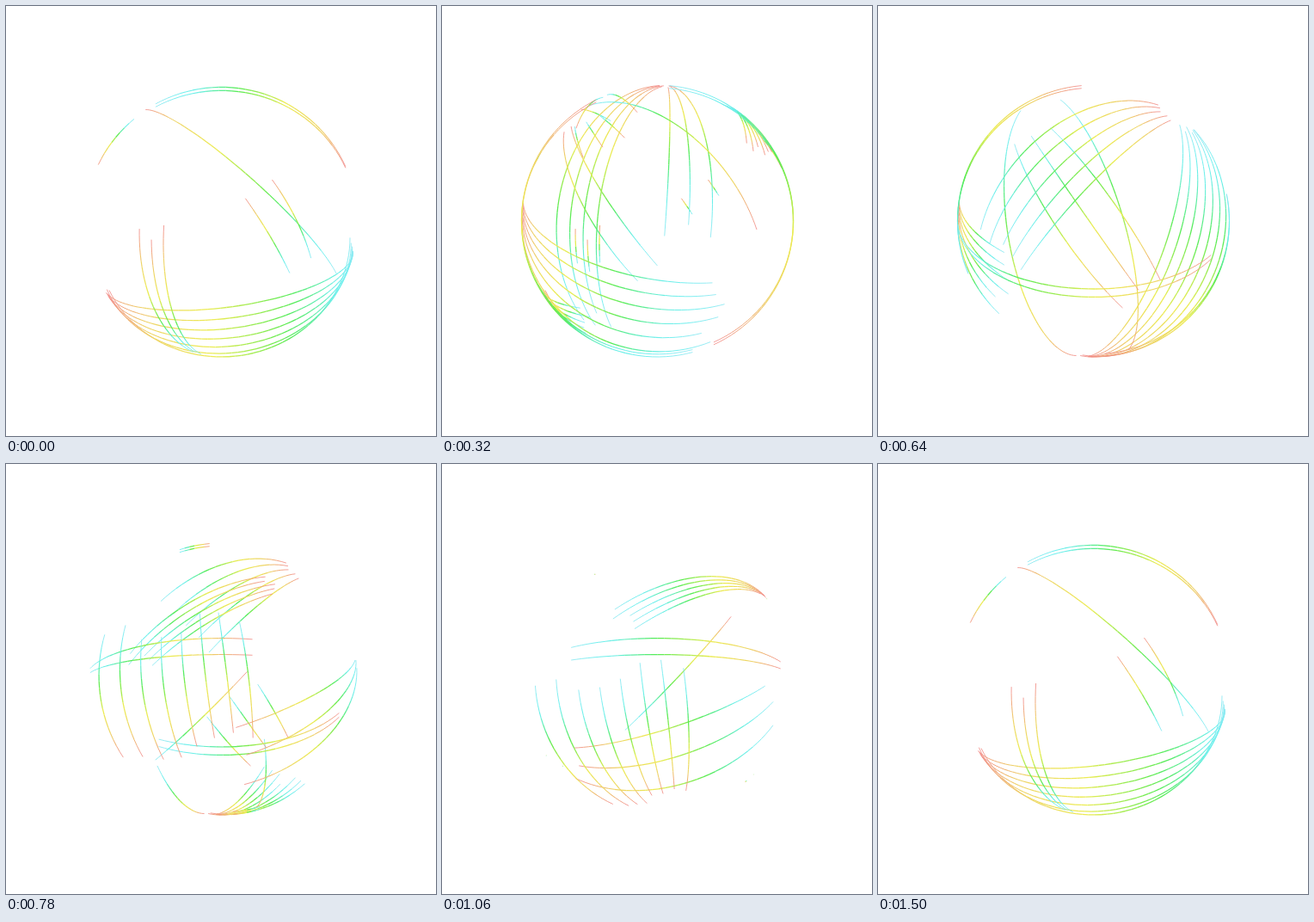
Animation of 500 by 500 pixels, one loop 1.52 s. Source, as an HTML page with a canvas:

```html
<!DOCTYPE html>
<html lang="en">
<head>
<meta charset="utf-8">
<title>Rainbow orbits</title>
<style>
html, body { margin: 0; width: 100%; height: 100%; overflow: hidden; background: #fff; }
canvas { display: block; width: 100vmin; height: 100vmin; }
</style>
</head>
<body>
<canvas id="stage" width="500" height="500"></canvas>
<script>
const LOOP = 1520, CX = 250.5, CY = 250, R = 158;
const HUES = [186, 176, 112, 60, 48, 0]; // from tail to head
const ctx = document.getElementById('stage').getContext('2d');

const rad = deg => deg * Math.PI / 180;
const mix = (a, b, u) => a + (b - a) * u;
const clamp = v => Math.max(0, Math.min(1, v));
const ease = u => u * u * (3 - 2 * u);
const wrap = v => ((v % LOOP) + LOOP) % LOOP;

let seed = 7;
function rnd() {
  seed = (seed * 16807) % 2147483647;
  return seed / 2147483647;
}

const orbits = [];

// Circles on the sphere that share an axis and a latitude and differ in tilt.
// A trail runs along each one between two angles.
function fan(life, count, axis, tilts, angles, lat = 0) {
  for (let i = 0; i < count; i++) {
    const tilt = mix(...tilts, count > 1 ? i / (count - 1) : 0);
    const [from, to] = angles.map(a => a + (count > 2 ? 10 * (rnd() - 0.5) : 0));
    orbits.push({ life, axis: rad(axis), tilt, lat: rad(lat), from: rad(from), to: rad(to) });
  }
}

// Trails that sweep into the lower right
const opening = [1190, 1900];
fan(opening, 7, -8, [0.3, 0.92], [4, 166], 22);
fan(opening, 2, 0, [0.96, 0.985], [-119, -24]);
fan(opening, 1, 222, [0.18, 0.18], [155, 10], 12);
fan(opening, 3, 95, [0.42, 0.6], [10, 84]);
fan(opening, 2, 55, [-0.24, -0.48], [53, 92]);
fan(opening, 1, 0, [0.98, 0.98], [-130, -155]);

// Meridians through the upper hub, and bands round the bottom
const rising = [60, 640];
fan(rising, 4, -84, [-0.44, -0.74], [140, 6]);
fan(rising, 3, -86, [0.06, 0.4], [92, 5]);
fan(rising, 1, -128, [0.62, 0.62], [12, 120]);
fan(rising, 2, -128, [-0.4, -0.21], [105, 20]);
fan([60, 760], 6, 190, [-0.43, -0.96], [122, 6]);

// Tall loops on both sides, with the outline
const fullest = [250, 850];
fan(fullest, 7, -71, [0.34, 0.88], [5, 172], 14);
fan(fullest, 1, -99, [-0.4, -0.4], [0, 176], -16);
fan(fullest, 1, -107, [0.3, 0.3], [0, 170], -5);
fan(fullest, 3, -125, [-0.25, 0.2], [25, 130]);
fan([100, 800], 2, 0, [0.98, 1], [-85, 85]);
fan([100, 800], 2, 0, [0.98, 1], [75, 265]);

// Crossing lines
const crossing = [400, 900];
fan(crossing, 5, -48, [-0.2, -0.72], [125, 20]);
fan(crossing, 2, 180, [-0.5, -0.56], [3, 150]);

// Loose weave that thins out
const closing = [640, 1240];
fan(closing, 3, -18, [0.24, 0.7], [8, 140], 8);
fan(closing, 1, -46, [0.1, 0.1], [140, 45]);
fan(closing, 5, -35, [-0.4, -0.6], [115, 8]);
fan(closing, 2, 0, [-0.18, -0.3], [165, 25]);
fan(closing, 8, -97, [-0.9, 0.2], [65, 150]);

// Short sparks, mostly near the rim and towards the lower right
for (let i = 0; i < 38; i++) {
  const angle = i % 2 ? mix(-60, 100, rnd()) : 360 * rnd();
  const size = mix(3, 14, rnd());
  const lift = 100 * rnd();
  fan([1040 + lift, 1320 + lift], 1, angle - 20, [mix(0.55, 1, rnd()), 0], [20, 20 + size], mix(-20, 20, rnd()));
}

function place({ axis, tilt, lat }, angle) {
  const along = Math.cos(lat) * Math.cos(angle);
  const across = Math.cos(lat) * Math.sin(angle) * tilt + Math.sin(lat) * Math.sqrt(1 - tilt * tilt);
  const c = Math.cos(axis), s = Math.sin(axis);
  return [CX + R * (along * c - across * s), CY + R * (along * s + across * c)];
}

function hueAt(u) {
  const x = u * (HUES.length - 1), i = Math.min(HUES.length - 2, Math.floor(x));
  return mix(HUES[i], HUES[i + 1], x - i);
}

function drawTrail(orbit, tail, head) {
  const start = mix(orbit.from, orbit.to, tail), end = mix(orbit.from, orbit.to, head);
  const steps = Math.max(6, Math.ceil(Math.abs(end - start) * 20));
  let last = place(orbit, start);
  for (let i = 1; i <= steps; i++) {
    const u = (i - 0.5) / steps, body = Math.sin(Math.PI * u);
    const next = place(orbit, mix(start, end, i / steps));
    ctx.strokeStyle = `hsl(${hueAt(u)}, 80%, ${mix(74, 62, body)}%)`;
    ctx.lineWidth = mix(0.8, 1.3, body);
    ctx.beginPath();
    ctx.moveTo(...last);
    ctx.lineTo(...next);
    ctx.stroke();
    last = next;
  }
}

// The head runs out first, the trail rests, then the tail catches up.
function render(time) {
  ctx.fillStyle = '#fff';
  ctx.fillRect(0, 0, 500, 500);
  for (const orbit of orbits) {
    const [born, gone] = orbit.life;
    const p = wrap(time - born) / (gone - born);
    if (p >= 1) continue;
    const head = ease(clamp(p * 2.5)), tail = clamp(p * 2.5 - 1.5);
    if (head - tail > 0.01) drawTrail(orbit, tail, head);
  }
}

const begin = performance.now();
function tick() {
  render((performance.now() - begin) % LOOP);
  requestAnimationFrame(tick);
}
render(0);
requestAnimationFrame(tick);
</script>
</body>
</html>
```
